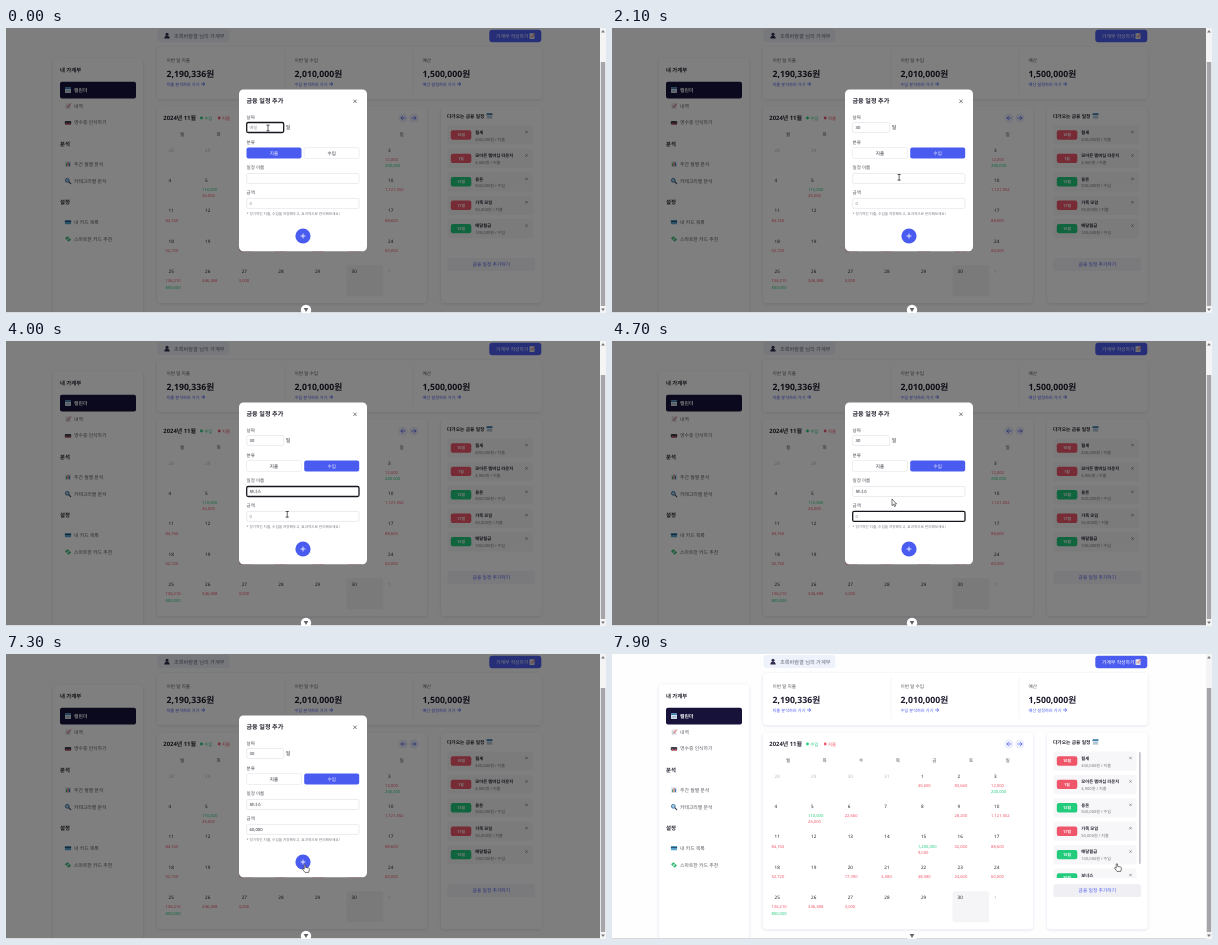
These frames come from a looping animation (600 by 285 pixels, 8 s). An HTML page:

```html
<!DOCTYPE html>
<html lang="ko">
<head>
<meta charset="utf-8">
<title>가계부</title>
<style>
html, body { margin: 0; width: 100%; height: 100%; overflow: hidden; background: #fff; }
svg { display: block; width: 100vw; height: 100vh; }
text { font-family: "Noto Sans", "Noto Sans CJK KR", "Noto Sans CJK", sans-serif; white-space: pre; }
</style>
</head>
<body>
<svg id="stage" viewBox="0 0 600 285" text-rendering="geometricPrecision">
  <defs>
    <filter id="soft" x="-10%" y="-10%" width="120%" height="120%">
      <feDropShadow dx="0" dy=".8" stdDeviation="1.6" flood-color="#303070" flood-opacity=".13"/>
    </filter>
    <clipPath id="listClip"><rect x="440" y="97" width="90" height="127"/></clipPath>
  </defs>
  <g id="page"></g>
  <g id="list" clip-path="url(#listClip)"></g>
  <g id="addButton"></g>
  <rect id="shade" width="594" height="285" opacity=".5"/>
  <g id="modal"></g>
  <g id="chrome"></g>
  <g id="cursor"></g>
</svg>
<script>
const LOOP = 8000, STEP = 100, CLOSE = 7400;
const BLUE = '#4a5cf0', NAVY = '#17123a', INK = '#25232f', GRAY = '#77767f', RED = '#f0566a', GREEN = '#22cc7c';
const $ = id => document.getElementById(id);

const rect = (x, y, w, h, fill, r = 0, more = '') =>
  `<rect x="${x}" y="${y}" width="${w}" height="${h}" rx="${r}" fill="${fill}" ${more}/>`;
const dot = (x, y, r, fill) => `<circle cx="${x}" cy="${y}" r="${r}" fill="${fill}"/>`;
const line = (d, color, w = .6) =>
  `<path d="${d}" fill="none" stroke="${color}" stroke-width="${w}" stroke-linecap="round" stroke-linejoin="round"/>`;
// y is the visual middle of the text line
const text = (x, y, s, size, fill = INK, weight = 400, anchor = 'start') =>
  `<text x="${x}" y="${y + size * .36}" font-size="${size}" fill="${fill}" font-weight="${weight}" text-anchor="${anchor}">${s}</text>`;
const card = (x, y, w, h) => rect(x, y, w, h, '#fff', 4, 'filter="url(#soft)"');
const cross = (x, y, r, color, w) =>
  line(`M${x - r} ${y - r}l${2 * r} ${2 * r}m0 ${-2 * r}l${-2 * r} ${2 * r}`, color, w);
const arrow = (x, y, dir, color) =>
  line(`M${x - 2 * dir} ${y}h${4 * dir}m${-1.6 * dir} -1.6l${1.6 * dir} 1.6l${-1.6 * dir} 1.6`, color, .7);

const icons = {
  calendar: (x, y) => rect(x - 3, y - 2.7, 6, 5.6, '#dfe9f2', .6) + rect(x - 3, y - 2.7, 6, 1.6, '#3f7fae', .5) +
    line(`M${x - 2} ${y + .4}h4m-4 1.4h4`, '#7b9bb5', .6),
  note: (x, y) => rect(x - 2.5, y - 2.7, 5, 5.6, '#e6e3ea', .4) + line(`M${x - 1.5} ${y}h2m-2 1.3h3`, '#9a98a5', .4) +
    line(`M${x} ${y + .7}l2.6 -2.8`, '#e0594f', 1),
  receipt: (x, y) => rect(x - 3.2, y - 1.6, 6.4, 3.6, '#44414f', .8) + dot(x - 1.4, y + 1.6, 1, '#d5586a') + dot(x + 1.7, y + 1.6, 1, '#d5586a'),
  chart: (x, y) => rect(x - 3, y - 2.8, 6, 5.6, '#d9e8f3', .5) + rect(x - 2, y - .5, 1, 2.7, '#45a55c') +
    rect(x - .5, y - 2, 1, 4.2, '#d9534f') + rect(x + 1, y - 1.2, 1, 3.4, '#3578c0'),
  lens: (x, y) => line(`M${x + .7} ${y + .7}l2 2`, '#34405a', 1.2) + `<circle cx="${x - .7}" cy="${y - .7}" r="1.9" fill="#9fd0ee" stroke="#34608c" stroke-width=".8"/>`,
  bank: (x, y) => rect(x - 3.1, y - 2.1, 6.2, 4.4, '#58a5cf', .7) + rect(x - 3.1, y - 1.1, 6.2, 1.1, '#2e5270'),
  money: (x, y) => `<path d="M${x - 3} ${y - .8}l2.4-2 3.6 3.4-2.2 2.2z" fill="#35b877"/>` + dot(x, y, .9, '#c7f0d9'),
  person: (x, y) => dot(x, y - 1.2, 1.5, '#322c50') + `<path d="M${x - 2.7} ${y + 3}c0-4 5.4-4 5.4 0z" fill="#322c50"/>`
};

const MENU = [
  ['내 가계부', 42], ['캘린더', 62, 'calendar', true], ['내역', 78, 'note'], ['영수증 인식하기', 94.5, 'receipt'],
  ['분석', 116], ['주간 월별 분석', 136, 'chart'], ['카테고리별 분석', 153, 'lens'],
  ['설정', 174], ['내 카드 목록', 194, 'bank'], ['스마트한 카드 추천', 211, 'money']
];
const menu = () => MENU.map(([label, y, icon, active]) =>
  !icon ? text(54, y, label, 5.4, INK, 600)
    : (active ? rect(54, 53.7, 76, 16.7, NAVY, 2) : '') + icons[icon](62, y) +
      text(68, y, label, 4.85, active ? '#fff' : '#5b5a64', active ? 600 : 400)).join('');

const STATS = [['이번 달 지출', '2,190,336원', '지출 분석하러 가기'],
  ['이번 달 수입', '2,010,000원', '수입 분석하러 가기'], ['예산', '1,500,000원', '예산 설정하러 가기']];
const stats = () => STATS.map(([label, sum, link], i) => {
  const x = 160.5 + i * 128;
  return (i ? line(`M${x - 9.5} 24v40`, '#ececf2', .6) : '') + text(x, 32, label, 4.6, '#55545e') +
    text(x, 45.7, sum, 8.7, '#1d1a2c', 600) + text(x, 56, link, 4.2, BLUE) + arrow(x + 36.5, 56, .75, BLUE);
}).join('');

// "+" marks income, "-" marks expense
const ENTRIES = {
  1: '-45,600', 2: '-83,660', 3: '-12,000 +200,000', 5: '+110,000 -26,000', 6: '-22,660', 9: '-28,200',
  10: '-1,121,552', 11: '-84,165', 15: '+1,200,000 -9,000', 16: '-32,000', 17: '-88,600', 18: '-52,720',
  20: '-17,390', 21: '-4,580', 22: '-48,580', 23: '-24,600', 24: '-60,000', 25: '-136,210 +800,000',
  26: '-346,388', 27: '-3,000'
};
function calendar() {
  let out = text(157.3, 90, '2024년 11월', 5.9, INK, 600) +
    dot(195.5, 90, 1.4, GREEN) + text(198.3, 90, '수입', 4.4, GREEN) +
    dot(213.2, 90, 1.4, RED) + text(216, 90, '지출', 4.4, RED) +
    [397, 408].map((x, i) => dot(x, 90, 4.6, '#eceefd') + arrow(x, 90, i ? 1 : -1, BLUE)).join('');
  [...'월화수목금토일'].forEach((day, i) => out += text(176 + i * 36.6, 106, day, 4.6, '#4d4c56', 400, 'middle'));
  for (let i = 0; i < 35; i++) {
    const x = 157.5 + (i % 7) * 36.6, y = 122 + Math.floor(i / 7) * 30.4;
    const day = i - 3, inside = day > 0 && day < 31;
    if (day === 30) out += rect(x, y - 6.3, 36.6, 31, '#f5f5f8', 2);
    out += text(x + 5, y, inside ? day : day < 1 ? day + 31 : day - 30, 4.6, inside ? INK : '#bcbcc4', inside ? 500 : 400);
    if (inside && ENTRIES[day]) ENTRIES[day].split(' ').forEach((e, k) =>
      out += text(x + 2, y + 9.3 + k * 6.2, e.slice(1), 4.1, e[0] === '+' ? GREEN : RED));
  }
  return out;
}

$('page').innerHTML = rect(0, 0, 600, 285, '#fefeff') +
  rect(151.5, 1, 72, 13, '#eef2fa', 3) + icons.person(161, 7.5) + text(168, 7.7, '초록바람결 님의 가계부', 5.2, '#65677a') +
  rect(483.3, 1.7, 52, 12.5, BLUE, 3) + text(490, 8, '가계부 작성하기', 4.85, '#fff', 500) + icons.note(526, 8) +
  card(47, 30.5, 90, 270) + menu() + card(151, 19, 384.5, 52) + stats() +
  card(151, 78.5, 270, 196.5) + calendar() + card(435, 78.5, 100.5, 196.5) +
  text(441, 88, '다가오는 금융 일정', 4.75, INK, 600) + icons.calendar(483.5, 88);

const PLANS = ['10일|월세|430,000원 / 지출', '1일|모아든 멤버십 라운지|4,900원 / 지출', '13일|용돈|500,000원 / 수입',
  '17일|가족 모임|50,000원 / 지출', '15일|매달월급|100,000원 / 수입', '30일|보너스|60,000원 / 수입'];
function plans(added) {
  const items = PLANS.slice(0, added ? 6 : 5).map((plan, i) => {
    const [day, name, sum] = plan.split('|'), y = 107 + i * 23.4;
    return rect(441.5, y - 9.6, added ? 83 : 85.5, 19.4, '#f7f7fa', 2.5) +
      rect(444.8, y - 4.7, 20.5, 9.4, sum.endsWith('수입') ? GREEN : RED, 2) +
      text(455, y, day, 3.9, '#fff', 600, 'middle') + text(469.3, y - 2.8, name, 4.3, INK, 600) +
      text(469.3, y + 4.2, sum, 4.05, GRAY) + cross(added ? 518.5 : 520.5, y - 3, .9, '#55545e', .5);
  }).join('');
  return items + (added ? rect(527, 98, 1.8, 112, '#c5c5cb', .9) : '');
}

$('chrome').innerHTML = rect(0, 284, 594, 1, '#d9d9dd') +
  dot(300, 282, 5.2, '#fff') + '<path d="M297.7 280h4.6l-2.3 4z" fill="#62616a"/>' +
  rect(594, 0, 6, 285, '#f4f4f5') + rect(594.8, 34, 4.4, 244, '#a6a6aa') +
  '<path d="M597 2l1.9 2.6h-3.8zM597 283l1.9-2.6h-3.8z" fill="#77767c"/>';

// Last entry whose start time has passed
const at = (keys, t) => keys.filter(k => k[0] <= t).pop()[1];
const DATE = [[0, ''], [500, '3'], [700, '30']];
const NAME = [[0, ''], [2500, 'ㅂ'], [2600, '보'], [2800, '본'], [3000, '보너'], [3200, '보넛'], [3400, '보너스']];
const SUM = [[0, ''], [5100, '6'], [5300, '60'], [5500, '600'], [5700, '6,000'], [5900, '60,000']];
const FOCUS = [[0, 'date'], [1500, ''], [2200, 'name'], [4200, 'sum'], [7200, '']];

const field = (x, y, w, value, hint, focused) =>
  rect(x, y, w, 10, '#fff', 1.5, `stroke="${focused ? '#17161d' : '#dfdfe6'}" stroke-width="${focused ? 1.3 : .6}"`) +
  text(x + 2.8, y + 5, value || hint, 4.2, value ? INK : '#8b8a93');
const tab = (x, label, on) =>
  rect(x, 119.5, 55, 11, on ? BLUE : '#fff', 2, on ? '' : 'stroke="#e6e6ec" stroke-width=".6"') +
  text(x + 27.5, 125, label, 4.5, on ? '#fff' : INK, 500, 'middle');

function modal(t) {
  const focus = at(FOCUS, t), name = at(NAME, t), income = t >= 1500;
  const composing = name && t < 3600;
  const lineStart = 243.3 + (name.length - 1) * 3.86;
  return rect(233, 61.5, 128, 161.7, '#fff', 4.5) +
    text(240.5, 73, '금융 일정 추가', 6.1, INK, 600) + cross(349, 73.3, 1.4, '#44434d', .7) +
    text(240.5, 89, '날짜', 4.5, '#4d4c56') + field(240.7, 94.5, 37, at(DATE, t), '매일', focus === 'date') +
    text(279.7, 99.5, '일', 5) +
    text(240.5, 114, '분류', 4.5, '#4d4c56') + tab(240.5, '지출', !income) + tab(298.2, '수입', income) +
    text(240.5, 139.7, '일정 이름', 4.5, '#4d4c56') + field(240.7, 145.5, 112.3, name, '', focus === 'name') +
    (composing ? line(`M${lineStart} 153h3.8`, INK, .5) : '') +
    text(240.5, 164.5, '금액', 4.5, '#4d4c56') + field(240.7, 170.4, 112.3, at(SUM, t), '0', focus === 'sum') +
    text(240.5, 186, '* 정기적인 지출, 수입을 저장해두고, 효과적으로 관리해보세요!', 3.6, GRAY) +
    dot(297, 208, 7.6, BLUE) + line('M295 208h4m-2-2v4', '#fff', .8);
}

// Pointer stops: time, x, y
const PATH = [[0, 262, 100], [900, 262, 100], [1300, 312, 126], [1700, 314, 126], [2200, 284, 152], [3500, 284, 152],
  [4100, 281, 175], [4400, 281, 175], [4700, 280, 160], [6100, 280, 160], [7000, 299, 213], [7300, 299, 213],
  [7400, 304, 210], [7900, 505, 212]];
function pointer(t) {
  const i = Math.max(1, PATH.findIndex(p => p[0] >= t));
  const [t0, x0, y0] = PATH[i - 1], [t1, x1, y1] = PATH[i];
  const k = (t - t0) / (t1 - t0), e = k * k * (3 - 2 * k);
  return [x0 + (x1 - x0) * e, y0 + (y1 - y0) * e];
}
const SHAPES = {
  beam: line('M-1.2 -2.8h2.4m-1.2 0v5.6m-1.2 0h2.4', '#222', .7),
  arrow: '<path d="M0-2v6.6l1.5-1.3 1 2.3 1.1-.5-1-2.2h2z" fill="#fff" stroke="#222" stroke-width=".6"/>',
  hand: '<path d="M-.8-2q.8-.8 1.4 0v2.4l3 .6q1 .3.8 1.4l-.6 3h-3.8l-2.4-3q-.2-1 .8-.8l.8.7z" fill="#fff" stroke="#222" stroke-width=".6"/>'
};
function shapeAt(x, y, t) {
  const inside = (l, top, r, b) => x > l && x < r && y > top && y < b;
  if (t >= CLOSE) return inside(441, 98, 529, 243) ? 'hand' : 'arrow';
  if (inside(240, 119, 353, 131) || Math.hypot(x - 297, y - 208) < 8) return 'hand';
  if (inside(240, 94, 278, 105) || inside(240, 145, 353, 156) || inside(240, 170, 353, 181)) return 'beam';
  return 'arrow';
}

function draw(now) {
  const t = Math.floor(now % LOOP / STEP) * STEP;
  const closed = t >= CLOSE, [x, y] = pointer(t);
  $('list').innerHTML = plans(closed);
  $('addButton').innerHTML = rect(441.5, 230, 87.5, 13, t >= 7800 ? '#f0f0f4' : '#f5f5f9', 2.5) +
    text(485.3, 236.5, '금융 일정 추가하기', 4.75, BLUE, 400, 'middle');
  $('shade').style.display = closed ? 'none' : '';
  $('modal').innerHTML = closed ? '' : modal(t);
  $('cursor').innerHTML = `<g transform="translate(${x} ${y})">${SHAPES[shapeAt(x, y, t)]}</g>`;
}

let start;
function tick(now) {
  start ??= now;
  draw(now - start);
  requestAnimationFrame(tick);
}
draw(0);
requestAnimationFrame(tick);
</script>
</body>
</html>
```
